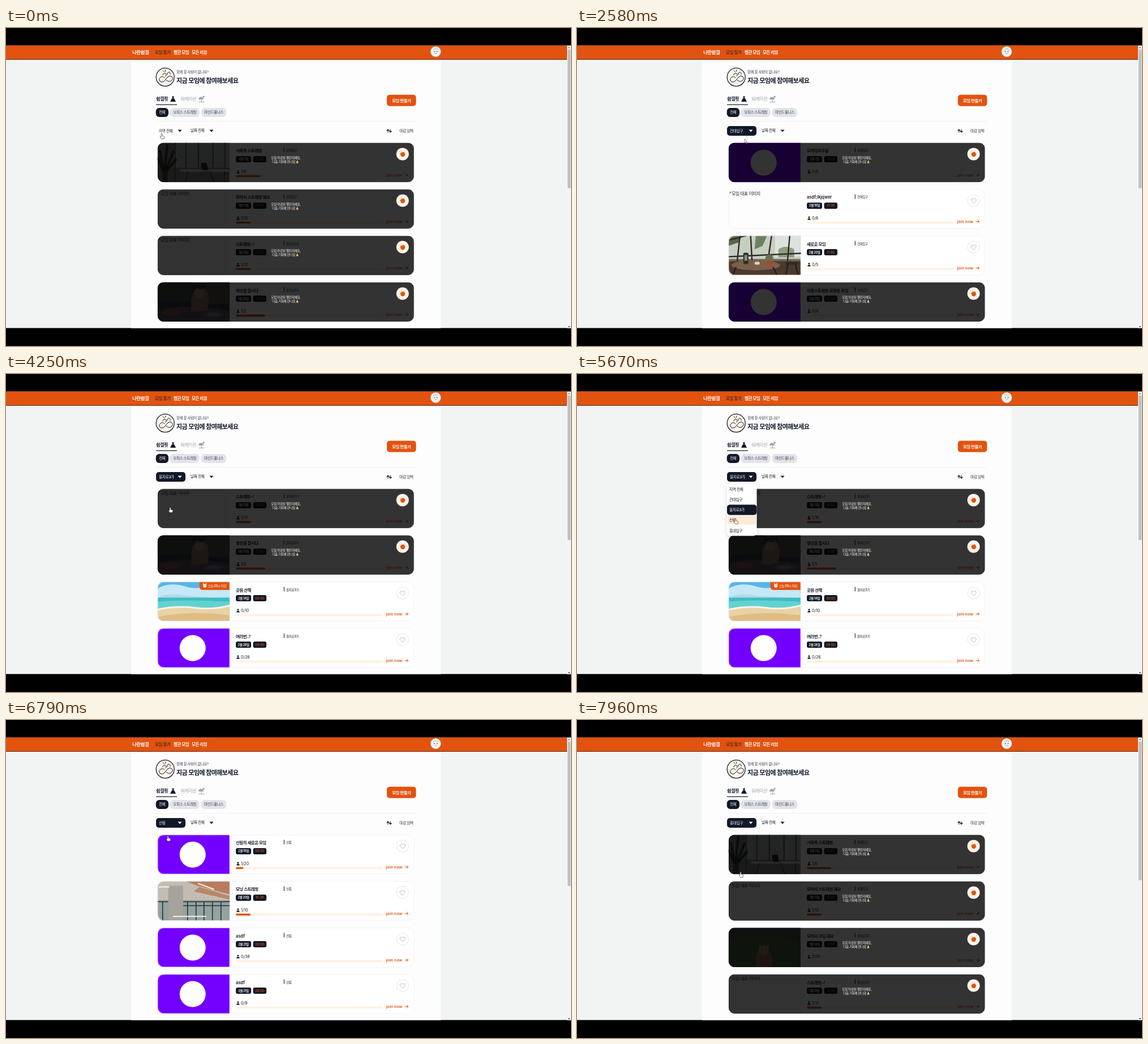
Animation of 998 by 561 pixels, one loop 8 s. Source, as an HTML page:

```html
<!DOCTYPE html>
<html lang="ko">
<head>
<meta charset="utf-8">
<style>
  html, body { margin: 0; width: 100%; height: 100%; overflow: hidden; background: #000; }
  svg { display: block; width: 100%; height: 100%; }
  text { font-family: Inter, "Noto Sans CJK KR", "Noto Sans CJK", sans-serif; white-space: pre; }
</style>
</head>
<body>
<svg id="stage" viewBox="0 0 998 561"></svg>
<script>
const ORANGE = '#e2530f', NAVY = '#111827', PURPLE = '#7300ff';
const LOOP = 8000, CARD_X = 267.7, CARD_TOP = 202.4, CARD_PITCH = 82.05, CARD_W = 453, CARD_H = 69.5;

const rect = (x, y, w, h, fill, r = 0, extra = '') =>
  `<rect x="${x}" y="${y}" width="${w}" height="${h}" rx="${r}" fill="${fill}" ${extra}/>`;
const circle = (x, y, r, fill, extra = '') => `<circle cx="${x}" cy="${y}" r="${r}" fill="${fill}" ${extra}/>`;
const path = (d, fill, extra = '') => `<path d="${d}" fill="${fill}" ${extra}/>`;
const line = (d, color, width = 1) =>
  path(d, 'none', `stroke="${color}" stroke-width="${width}" stroke-linecap="round" stroke-linejoin="round"`);
const group = (x, y, body, extra = '') => `<g transform="translate(${x} ${y})" ${extra}>${body}</g>`;
const text = (x, y, size, str, fill = NAVY, weight = 400, anchor = 'start') => {
  const spacing = /[가-힣]/.test(str) ? -0.06 * size : 0;
  return `<text x="${x}" y="${y}" font-size="${size}" fill="${fill}" font-weight="${weight}" ` +
    `text-anchor="${anchor}" letter-spacing="${spacing}">${str}</text>`;
};
const caret = (x, color) => path(`M${x - 3.5} 179.5h7l-3.5 4z`, color);

// Card pictures, drawn in a 127 by 69.5 box
const pictures = {
  broken: rect(0, 0, 127, 70, '#fdfdfd') + rect(.5, 2, 4.5, 5, '#b9c4cf') + path('M.5 7l2.5-3 2 3z', '#5a9a55') +
    text(5.5, 10.3, 7.8, '모임 대표 이미지', '#222'),
  purple: rect(0, 0, 127, 70, PURPLE) + circle(62, 35, 23, '#fff'),
  office: rect(0, 0, 127, 70, '#7e807c') + rect(30, 0, 97, 44, '#b0b5b4') +
    line('M31 0V68M50 0V46M72 0V44M98 0V44M119 0V44', '#555b5a', 2) +
    line('M12 55L4 14M12 55L17 4M12 55L28 16M12 55L32 30M12 55L1 28', '#2f382c', 4) +
    rect(8, 50, 10, 20, '#454540') + path('M40 47h87v4H40z', '#d4d3cd') +
    path('M76 36l11-1 2 13H79z', '#26292b') + line('M54 51l-5 18M92 51l7 18M118 51v18', '#454745', 1.6),
  dog: rect(0, 0, 127, 70, '#34373a') + rect(0, 0, 62, 34, '#42493d') + rect(87, 0, 40, 38, '#55504c') +
    path('M0 48Q60 37 127 51V70H0z', '#5a5260') +
    path('M60 52Q57 16 70 10l5 3 8-3Q94 20 88 50z', '#8c7462') + circle(74, 20, 8, '#a18b75') +
    `<ellipse cx="99" cy="57" rx="18" ry="5.5" fill="#8556a5"/><ellipse cx="99" cy="57" rx="11" ry="3" fill="#6f9c72"/>` +
    `<ellipse cx="26" cy="53" rx="18" ry="5" fill="#925452"/>`,
  cafe: rect(0, 0, 127, 70, '#756554') + rect(0, 0, 127, 41, '#c6cec2') + rect(82, 0, 45, 37, '#dce3df') +
    path('M0 0h24L17 12 0 18z', '#566a47') + path('M48 0h20l-8 18-14 6z', '#6e805e') + path('M88 24q12-9 28 0v14H88z', '#8d9c80') +
    line('M0 8L30 0M20 0L15 48M39 0L42 53M76 0L68 54M108 0L103 59M0 37L127 31', '#312c28', 2.5) +
    rect(0, 45, 127, 25, '#4b392d') + `<ellipse cx="48" cy="52" rx="43" ry="9" fill="#79604b"/>` +
    rect(26, 30, 9, 20, '#29302f', 2) + rect(28, 34, 5, 10, '#888e85') +
    circle(72, 40, 7, '#65744b') + rect(67, 44, 11, 12, '#9b4d39', 1) + rect(46, 46, 9, 5, '#ded3be', 2) +
    path('M101 46h22v5h-22z', '#302a27') + line('M105 50l-4 19M118 50l5 19M13 56l-6 14M79 56l7 14', '#241f1c', 2.5),
  beach: rect(0, 0, 127, 70, '#57b5ea') + path('M0 12Q20 0 48 8T90 4T127 15V29H0z', '#c5e8f7') +
    path('M0 28Q25 18 52 25L127 29H0z', '#b4d8e3') + rect(0, 28, 127, 22, '#3dbcc7') +
    path('M0 35Q40 31 127 35V55L0 48z', '#63d2cf') +
    path('M0 49Q34 42 66 46T127 42V70H0z', '#ead2a4') + line('M0 49Q34 42 66 46T127 42', '#f5f5eb', 3) +
    path('M0 62Q58 50 127 59V70H0z', '#dfbd86'),
  loft: rect(0, 0, 127, 70, '#8b928f') + path('M0 0H127V34H0z', '#c3bcb3') +
    path('M50 0h77v23L71 8z', '#b87b5d') + path('M64 18l10-8 53 16v6z', '#b98768') +
    rect(0, 36, 127, 34, '#92a3a1') + rect(19, 8, 26, 62, '#a5a39c') +
    line('M0 36H18M46 36H127M46 43H127M9 36V70M53 36V70M68 36V70M82 36V70M97 36V70M112 36V70', '#262f2f', 1.6) +
    line('M3 10h17M72 4l27 10M28 62H85', '#f7f5e7', 2),
  grass: rect(0, 0, 127, 70, '#3e5438') + rect(0, 0, 127, 20, '#44504a') + path('M0 18Q65 10 127 20V70H0z', '#465f39') +
    path('M49 70Q48 43 54 38l-1-10 7 5h5l7-5-1 12Q79 47 76 70z', '#91704e') + circle(62, 40, 9, '#ac8861') +
    circle(59, 39, 1, '#222') + circle(66, 39, 1, '#222')
};

const card = (title, place, date, time, joined, limit, picture, closed = true, badge = '') =>
  ({ title, place, date, time, joined, limit, picture, closed, badge });
const turtle = card('거북목 스트레칭', '홍대입구', '2월 2일', '11:00', 1, 6, 'office');
const together = card('모여서 스트레칭 해요', '홍대입구', '1월 13일', '11:00', 1, 10, 'broken');
const stretch = card('스트레칭~!', '을지로3가', '1월 13일', '11:00', 1, 10, 'broken');
const meditate = card('명상을 합시다', '을지로3가', '1월 20일', '11:00', 1, 5, 'dog');
const PENDING = 4;   // unfiltered list shown until the filtered one arrives
const lists = [
  [turtle, together, stretch, meditate],
  [card('모여라모두들', '건대입구', '2월 7일', '11:00', 0, 8, 'purple'),
   card('asdf;lkjqwer', '건대입구', '2월 19일', '21:30', 0, 6, 'broken', false),
   card('새로운 모임', '건대입구', '2월 20일', '11:00', 0, 5, 'cafe', false),
   card('아침스트레칭 회원용 모임', '건대입구', '2월 21일', '09:00', 0, 9, 'purple')],
  [stretch, meditate,
   card('공원 산책', '을지로3가', '2월 14일', '09:00', 0, 10, 'beach', false, '오늘 09시 마감'),
   card('여러번..?', '을지로3가', '2월 28일', '09:00', 0, 26, 'purple', false)],
  [card('신림의 새로운 모임', '신림', '2월 19일', '09:00', 1, 20, 'purple', false),
   card('모닝 스트레칭', '신림', '2월 20일', '16:30', 1, 10, 'loft', false),
   card('asdf', '신림', '2월 21일', '09:00', 0, 38, 'purple', false),
   card('asdf', '신림', '2월 21일', '09:00', 0, 9, 'purple', false)],
  [turtle, together, card('모여서 코딩 해요', '을지로3가', '1월 14일', '11:00', 0, 10, 'grass'), stretch]
];
const regions = ['지역 전체', '건대입구', '을지로3가', '신림', '홍대입구'];

function drawCard(c, i) {
  let s = rect(0, 0, CARD_W, CARD_H, '#fff') + pictures[c.picture];
  if (c.badge) {
    s += path('M74 0h53v14.5H80q-6 0-6-6z', ORANGE) + circle(83.5, 7.3, 3, '#fff') +
      line('M80.7 4.2l1-1M86.3 4.2l-1-1', '#fff', 1.3) + line('M82.2 6.5l1.2 1.3 1.8-1.8', ORANGE, .8) +
      text(89, 9.4, 5.5, c.badge, '#fff', 500);
  }
  s += text(138.3, 17, 7.4, c.title, NAVY, 600) + rect(223, 9, 1.1, 8, NAVY) + text(227.2, 16, 5.5, c.place, NAVY, 500) +
    rect(138.3, 23.5, 27, 11, NAVY, 3) + text(151.8, 31, 5.5, c.date, '#fff', 600, 'middle') +
    rect(168.8, 23.5, 23.5, 11, NAVY, 3) + text(180.5, 31, 5.5, c.time, ORANGE, 500, 'middle') +
    circle(142.2, 49.3, 1.5, NAVY) + path('M139.5 54q0-2.8 2.7-2.8t2.7 2.8z', NAVY) +
    text(147.3, 53.7, 7, `${c.joined}/${c.limit}`, NAVY) +
    rect(138.3, 57, 260, 3.6, '#fff1e2', 1.8) + rect(138.3, 57, 260 * c.joined / c.limit, 3.6, ORANGE, 1.8) +
    text(403.7, 59.2, 7.1, 'join now', ORANGE, 600) + line('M437.2 57h5.5m-2.7-2.7l2.7 2.7-2.7 2.7', ORANGE, 1);
  if (c.closed) {
    s += rect(0, 0, CARD_W, CARD_H, '#000', 0, 'opacity=".8"') +
      text(226.5, 28.6, 5.6, '모집 마감된 챌린지예요,', '#fff', 500, 'middle') +
      text(202.5, 35.9, 5.6, '다음 기회에 만나요', '#fff', 500) +
      path('M246.7 30.5l2.2 4.8-2.2 1.2-2-1.2z', '#ffc83d') + path('M244.6 35.3h4.4v1.3h-4.4z', '#7c59a8') +
      circle(432.8, 20, 11, '#fff5e9') +
      path('M428.8 19.2q2.5-3 5.5-2.5l2.6 3.5q.4 4-4 4.7l-3-1.2z', ORANGE) +
      line('M429.3 19.7l3.7 4M431.5 17.4l3.7 4M434.8 16.7l2 4', ORANGE, 1.5) + line('M428 16l1.2 1M430.8 14.5l.5 1.2', '#f29b65', .8);
  } else {
    s += circle(432.8, 20, 10.6, '#fff', 'stroke="#e0e2e7" stroke-width=".9"') +
      line('M432.8 24.5l-4-3.9q-1.6-2.2.3-3.8 2-1.3 3.7.9 1.7-2.2 3.7-.9 1.9 1.6.3 3.8z', '#aeb4bf', .9);
  }
  return group(CARD_X, CARD_TOP + i * CARD_PITCH, group(0, 0, s, 'clip-path="url(#card)"') +
    (c.closed ? '' : rect(.3, .3, CARD_W - .6, CARD_H - .6, 'none', 11, 'stroke="#eceef1" stroke-width=".7"')));
}

const chip = (x, w, label, active) => rect(x, 141, w, 16, active ? NAVY : '#e3e4e9', 6) +
  text(x + w / 2, 151.3, 6.6, label, active ? '#fff' : '#374151', 500, 'middle');

const page = rect(0, 30.6, 998, 499, '#f2f4f4') + rect(221, 56, 547, 474, '#fdfdfe') +
  rect(0, 30.6, 991, 25, ORANGE) + rect(0, 55, 991, 1, '#5a2814') +
  text(223, 45.8, 8.5, '나란쉼결', '#fff', 700) + text(263, 45.6, 7.5, '모임 찾기', NAVY, 500) +
  text(296, 45.6, 7.5, '찜한 모임', '#fff', 600) + text(328, 45.6, 7.5, '모든 리뷰', '#fff', 600) +
  circle(759, 41.7, 9, '#f3f4f4', 'stroke="#d3d4d5" stroke-width=".6"') +
  line('M755 38q4-3 8 0', '#a1a3a6', .9) + circle(756.5, 41.5, 1, '#555') + circle(761.5, 41.5, 1, '#555') + line('M757 45h4', '#999', .8) +
  circle(281.2, 86.7, 16, '#fff5e9', `stroke="${NAVY}" stroke-width="1.3"`) +
  line('M280 88q-3-4-7-1t-1 7q4 3 8-1l6-7q4-3 7 0t-1 7q-4 3-9-1M277 83q0-4 4-3t1 5M285 82q-1-3 2-4 4 0 3 4M277 75l2 2M282 74l-1 3', NAVY, 1) +
  text(301, 80, 6.4, '함께 할 사람이 없나요?', '#374151', 400) +
  text(301, 97, 11.1, '지금 모임에 참여해보세요', NAVY, 600) +
  text(265, 128.2, 8.2, '쉼결핏', NAVY, 700) + rect(265, 134.7, 37, 1.2, NAVY) +
  circle(295, 122, 1.8, NAVY) + path('M293 124h4l2 4 1.2 2H290l1-2z', NAVY) +
  text(308, 128.2, 8.2, '워케이션', '#9ca3af', 500) +
  path('M340 126q1-6 6-4 3 1 3 4z', '#9ca3af') + line('M344.5 125l1 5M341 130.5h9', '#9ca3af', 1) + circle(349, 121.3, 1.7, '#9ca3af') +
  rect(672.7, 117.8, 51.6, 20, ORANGE, 5) + text(698.5, 130.5, 7.4, '모임 만들기', '#fff', 600, 'middle') +
  chip(264.7, 22.3, '전체', true) + chip(290, 51.5, '오피스 스트레칭') + chip(345, 44, '마인드풀니스') +
  rect(265, 164, 459, .9, '#eeeef2') +
  text(326, 183.3, 6.7, '날짜 전체', NAVY, 500) + caret(363, NAVY) +
  line('M674.7 184v-5m-2 2l2-2 2 2M679 179v5m-2-2l2 2 2-2', NAVY, 1.1) +
  text(695, 183.6, 6.7, '마감 임박', '#1f2937', 500);

function drawControls(open, selected, list, hovered) {
  const ink = selected ? '#fff' : NAVY;
  let s = rect(991, 31, 7, 499, '#f4f4f4') + rect(992, 38, 5.5, list === 2 || list === 3 ? 255 : 244.5, '#c1c1c1') +
    path('M992.5 35.5h4l-2-2.5z', '#777') + path('M992.5 526h4l-2 2.5z', '#555') +
    rect(265, 173, 52, 17, selected ? NAVY : '#fff', 5) + text(270, 183.6, 6.7, regions[selected], ink, 500) + caret(307, ink);
  if (open) {
    s += rect(265, 194, 52.5, 91.5, '#fff', 6, 'filter="url(#shadow)"');
    regions.forEach((name, i) => {
      const y = 194 + i * 18.25, active = i === selected;
      if (active) s += rect(265, y, 52.5, 18.2, NAVY, 5);
      else if (i === hovered) s += rect(266, y + 1.5, 50, 15.2, '#ffead3', 4);
      s += text(269, y + 11.6, 6.7, name, active ? '#fff' : NAVY, 500);
    });
  }
  return s;
}

// time, menu open, selected region, list shown
const states = [
  [0, 0, 0, 0], [420, 1, 0, 0],
  [1750, 0, 1, 0], [1790, 0, 1, PENDING], [2170, 0, 1, 1], [2870, 1, 1, 1],
  [3880, 0, 2, 1], [3920, 0, 2, PENDING], [4210, 0, 2, 2], [5080, 1, 2, 2],
  [5880, 0, 3, 2], [5920, 0, 3, PENDING], [6330, 0, 3, 3], [7250, 1, 3, 3],
  [7920, 0, 4, 3], [7960, 0, 4, PENDING]
];
// time, x, y of the pointer tip at each rest
const moves = [
  [0, 275, 186], [40, 275, 186], [320, 284, 182], [440, 284, 182], [830, 291, 212], [920, 291, 212],
  [1080, 293, 223], [1330, 293, 223], [1420, 293, 222], [2250, 293, 222], [2810, 298, 181],
  [2910, 298, 181], [3380, 288, 252], [3500, 288, 252], [3710, 290, 235], [4250, 290, 235], [4670, 286, 187],
  [4710, 286, 187], [4880, 285, 182], [5080, 285, 182], [5670, 280, 255], [6330, 280, 255],
  [7080, 289, 179], [7250, 289, 179], [7710, 289, 268], [LOOP, 289, 268]
];

function pointerAt(t) {
  const i = moves.findIndex(m => m[0] > t);
  const [t0, x0, y0] = moves[i - 1], [t1, x1, y1] = moves[i];
  const p = (t - t0) / (t1 - t0), e = p * p * (3 - 2 * p);
  return [x0 + (x1 - x0) * e, y0 + (y1 - y0) * e];
}

const stage = document.getElementById('stage');
stage.innerHTML = `<defs><clipPath id="card">${rect(0, 0, CARD_W, CARD_H, '#000', 11)}</clipPath>
  <clipPath id="window">${rect(0, 30.6, 998, 499, '#000')}</clipPath>
  <filter id="shadow" x="-30%" y="-20%" width="160%" height="150%"><feDropShadow dx="1" dy="4" stdDeviation="4" flood-opacity=".15"/></filter></defs>
  <rect width="998" height="561"/><g clip-path="url(#window)">${page}
  ${lists.map((cards, i) => `<g id="list${i}">${cards.map(drawCard).join('')}</g>`).join('')}
  <g id="controls"></g><g id="pointer">
  <g id="hand">${path('M-1 .8Q0-.4 1 .8V4l3 .8q1 .3.8 1.5L4 9.5H-.5L-3 6q.2-1 1.2-.5L-1 6z', '#fff', 'stroke="#222" stroke-width=".6"')}</g>
  <g id="arrow">${path('M0 0V7l1.6-1.4 1.1 2.5 1-.5-1.1-2.4 2.1-.2z', '#fff', 'stroke="#222" stroke-width=".5"')}</g></g></g>`;
const el = id => document.getElementById(id);
const show = (node, visible) => node.setAttribute('display', visible ? 'inline' : 'none');

let drawn = '';
function frame(now) {
  const t = now % LOOP;
  const [, open, selected, list] = states.findLast(s => s[0] <= t);
  const [x, y] = pointerAt(t);
  const hovered = open ? Math.floor((y - 194) / 18.25) : -1;
  const key = [open, selected, list, hovered].join();
  if (key !== drawn) {
    drawn = key;
    lists.forEach((_, i) => show(el('list' + i), i === list));
    el('controls').innerHTML = drawControls(open, selected, list, hovered);
  }
  const idle = y > 190 && y < (open ? 194 : CARD_TOP);
  show(el('arrow'), idle);
  show(el('hand'), !idle);
  el('pointer').setAttribute('transform', `translate(${x} ${y})`);
  requestAnimationFrame(frame);
}
frame(0);
</script>
</body>
</html>
```
